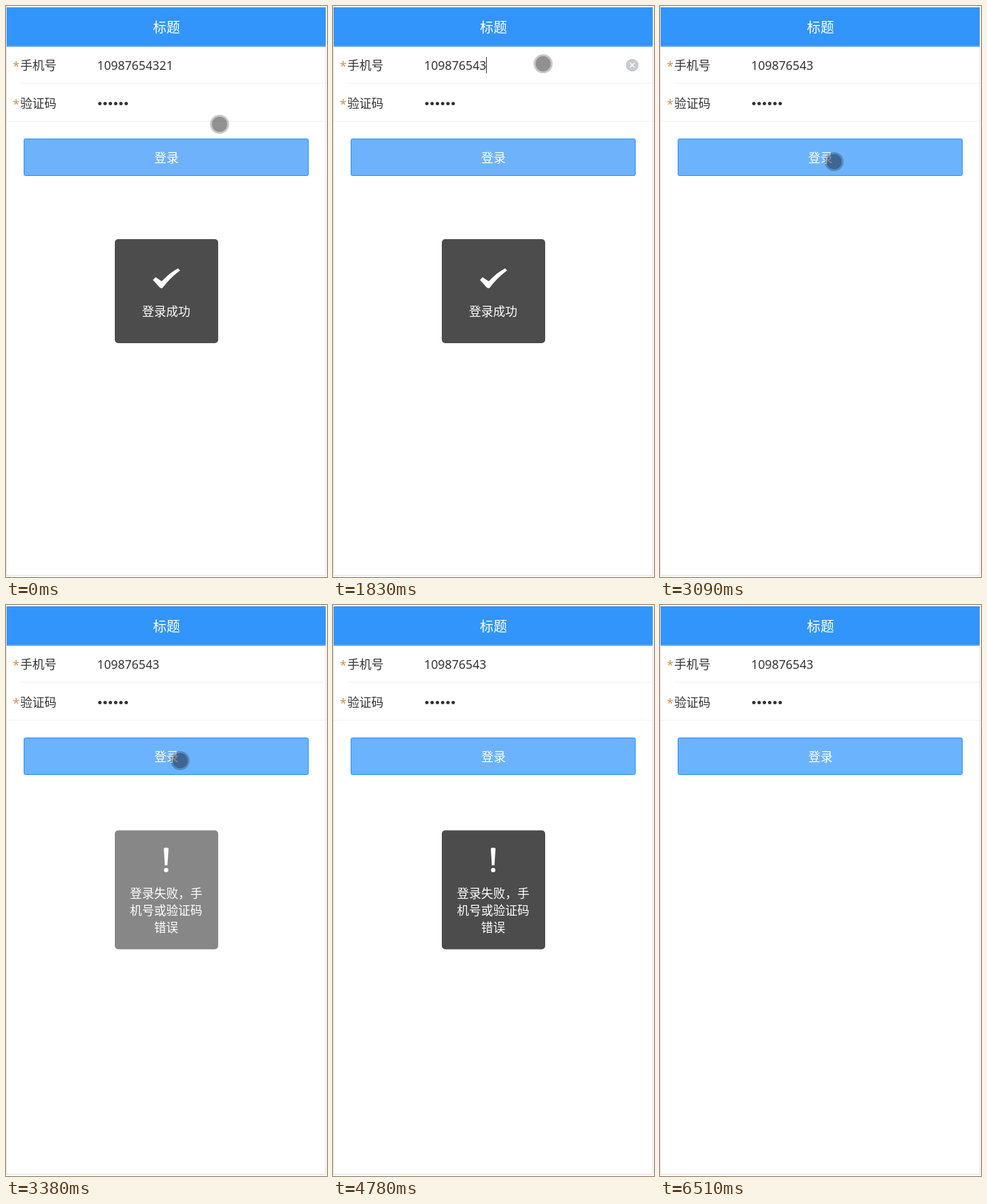
These frames come from a looping animation (472x840 px, 6720 ms). An HTML page:

```html
<!DOCTYPE html>
<html lang="zh-CN">
<head>
<meta charset="utf-8">
<title>标题</title>
<style>
  html, body { margin: 0; width: 100%; height: 100%; overflow: hidden; background: #fff; }
  svg { display: block; font: 17.75px "Noto Sans CJK SC", "Noto Sans CJK", sans-serif; fill: #333; }
  .mid { text-anchor: middle; fill: #fff; }
  .latin { font-family: "Noto Sans", "Open Sans", sans-serif; font-size: 17.8px; }
  .star { fill: #d0914a; }
</style>
</head>
<body>
<svg width="472" height="840" viewBox="0 0 472 840">
  <path d="M.5 2V837.5H470.5V2" fill="none" stroke="#dfdfdf"/>
  <path d="M0 1.5H471" stroke="#ececec"/>
  <rect x="1" y="2" width="469" height="57" fill="#3195fc"/>
  <rect x="1" y="58" width="469" height="2" fill="#5ca3ea"/>
  <text class="mid" x="236" y="38.5" font-size="20">标题</text>

  <path d="M21 113.5H470M1 169.5H470" stroke="#f3f3f3"/>
  <text class="latin star" x="10" y="95">*</text>
  <text class="latin star" x="10" y="150.5">*</text>
  <text x="21" y="94">手机号</text>
  <text x="21" y="149.5">验证码</text>
  <text class="latin" id="phone" x="134" y="93.5"></text>
  <g id="dots"></g>
  <rect id="caret" y="75" width="1" height="24"/>
  <g id="clear">
    <circle cx="440" cy="87" r="9.3" fill="#c8cad0"/>
    <path d="M436.5 83.5l7 7m0-7l-7 7" stroke="#fff" stroke-width="1.3"/>
  </g>

  <rect id="button" x="26.5" y="195.5" width="418" height="54" rx="2" stroke="#218ffa"/>
  <text class="mid" x="236" y="229.5" font-size="18">登录</text>

  <g id="success">
    <rect x="160" y="343" width="152" height="153" rx="5" fill-opacity=".7" fill="#000"/>
    <path d="M216 403l4-4 9 6Q241 392 253 386l3 3Q241 400 230 415q-2 1-4-1z" fill="#fff"/>
    <text class="mid" x="235.5" y="456">登录成功</text>
  </g>
  <g id="failure">
    <rect x="160" y="331.5" width="152" height="175" rx="5" fill-opacity=".7" fill="#000"/>
    <path d="M232 358q3.5-2 7 0l-1.6 25h-3.8z" fill="#fff"/>
    <circle cx="235.5" cy="390" r="3.2" fill="#fff"/>
    <text class="mid" x="235.5" y="431">登录失败，手</text>
    <text class="mid" x="235.5" y="456">机号或验证码</text>
    <text class="mid" x="235.5" y="481">错误</text>
  </g>

  <g id="pointer" fill="#000">
    <circle r="12.6" fill="none" stroke="#000" stroke-width="2.8" stroke-opacity=".22"/>
    <circle r="11.2" fill-opacity=".43"/>
  </g>
</svg>
<script>
const LOOP = 6720, PHONE = "10987654321", DIGIT = 10.18;
const el = id => document.getElementById(id);
const show = (id, on) => el(id).setAttribute("opacity", +on);
const within = (t, from, to) => t >= from && t < to;

// Latest value of a list of [time, value] pairs
const held = (t, keys) => keys.reduce((v, [at, next]) => t >= at ? next : v, 0);

const successFade = [[0, 1], [2110, .9], [2250, .4], [2350, 0]];
const failureFade = [[3220, .13], [3300, .4], [3380, .667], [3490, .95], [3560, 1],
                     [6270, .9], [6360, .55], [6430, .25], [6510, 0]];

// Eased progress that advances in equal jumps
function glide(t, from, to, steps) {
  if (t < from) return 0;
  const s = Math.min(1, (Math.floor((t - from) / (to - from) * (steps - 1) + 1e-6) + 1) / steps);
  return s * s * (3 - 2 * s);
}

function pointerAt(t) {
  if (t < 2450) {
    const s = glide(t, 70, 480, 6);
    return [314 - 5 * s, 174 - 89 * s - 2 * within(t, 740, 800)];
  }
  if (t < 4670) {
    const s = glide(t, 2450, 2900, 8);
    const curve = (a, b, c) => a * (1 - s) ** 2 + 2 * b * s * (1 - s) + c * s * s;
    return [curve(309, 384, 256), curve(85, 150, 229)];
  }
  return t < 4730 ? [350, 326] : [456, 427];
}

function draw(now) {
  const t = now % LOOP;
  const count = t < 1640 ? 11 : t < 1830 ? 10 : 9;
  el("phone").textContent = PHONE.slice(0, count);
  el("caret").setAttribute("x", Math.floor(134 + DIGIT * count));
  show("caret", within(t, 740, 1330) || within(t, 1640, 2110) || within(t, 2640, 3000));
  show("clear", within(t, 740, 3000));
  el("button").setAttribute("fill", t < 3000 ? "#6eb2fb" : "#6cb3fe");
  show("success", held(t, successFade));
  show("failure", held(t, failureFade));
  el("pointer").setAttribute("transform", `translate(${pointerAt(t)})`);
  show("pointer", t < 4780);
  requestAnimationFrame(draw);
}

for (let i = 0; i < 6; i++)
  el("dots").innerHTML += `<circle cx="${138 + 7.75 * i}" cy="143.5" r="2.5"/>`;
draw(0);
</script>
</body>
</html>
```
